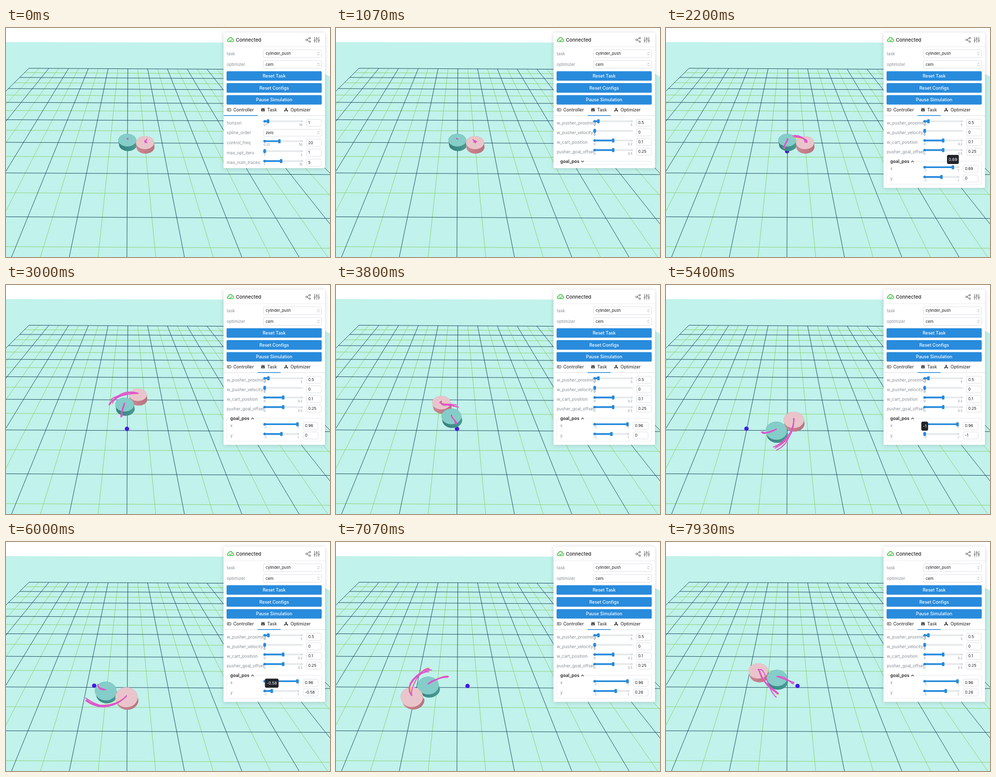
These frames come from a looping animation (640 px wide and 453 px high, 8 s). An HTML page with a canvas:

```html
<!DOCTYPE html>
<html lang="en">
<head>
<meta charset="utf-8">
<style>
html, body { margin: 0; width: 640px; height: 453px; overflow: hidden; background: #fff; }
canvas { display: block; width: 640px; height: 453px; }
</style>
</head>
<body>
<canvas id="stage"></canvas>
<script>
const LOOP = 8000, BLUE = '#288bdc', GRAY = '#868e96', BORDER = '#d5dade', INK = '#1a1a1a';
const canvas = document.getElementById('stage');
const dpr = window.devicePixelRatio || 1;
canvas.width = 640 * dpr;
canvas.height = 453 * dpr;
const g = canvas.getContext('2d');

// Where the teal body is, and at what angle (degrees) the pink pusher touches it
const POSES = [
  { at: 2400, x: 239.5, y: 222, angle: 11 },
  { at: 3800, x: 228, y: 260, angle: -120 },
  { at: 4800, x: 236, y: 278, angle: -81 },
  { at: 6000, x: 197, y: 295, angle: 19 },
  { at: 7070, x: 182, y: 284, angle: 140 },
  { at: 7930, x: 219, y: 269, angle: 205 },
  { at: 8800, x: 252, y: 282, angle: 140 }
];

const clamp = v => Math.max(0, Math.min(1, v));
const ramp = (t, from, to) => clamp((t - from) / (to - from));
const goalX = t => 0.96 * ramp(t, 2000, 2280);
const goalY = t => 1.26 * ramp(t, 5800, 6400) - ramp(t, 4200, 4600);

// Perspective radius and flattening of a cylinder at stage height y
const radius = y => 0.0525 * (y + 114.7);
const flatness = y => (y + 114.7) / 475;

function random(seed) {
  const v = Math.sin(seed * 127.1 + 11.7) * 43758.5453;
  return v - Math.floor(v) - 0.5;
}

// Catmull-Rom through the poses
function bodiesAt(t) {
  const last = POSES.length - 1;
  let k = 0;
  while (k < last - 1 && t >= POSES[k + 1].at) k++;
  const pose = i => POSES[Math.max(0, Math.min(last, i))];
  const [a, b, c, d] = [-1, 0, 1, 2].map(i => pose(k + i));
  const u = ramp(t, b.at, c.at);
  const mix = key => b[key] + u / 2 * (c[key] - a[key] +
    u * (2 * a[key] - 5 * b[key] + 4 * c[key] - d[key] +
    u * (3 * (b[key] - c[key]) + d[key] - a[key])));
  const x = mix('x'), y = mix('y'), angle = mix('angle') * Math.PI / 180;
  const reach = 2.02 * radius(y);
  return {
    teal: { x, y },
    pink: { x: x + reach * Math.cos(angle), y: y + reach * flatness(y) * Math.sin(angle) }
  };
}

// Ground coordinates (cells from the middle) to the stage
function project(x, z) {
  const depth = 2265.7 / (6.636 - z), sx = 240.7 + x * 0.2005 * depth, sy = depth - 114.7;
  return [sx - 0.005 * (sy - 80), sy + 0.005 * (sx - 120)];
}

function line(points, color, width) {
  g.beginPath();
  points.forEach(p => g.lineTo(...p));
  g.strokeStyle = color;
  g.lineWidth = width;
  g.stroke();
}

function disc(x, y, r, fill, stroke) {
  g.beginPath();
  g.arc(x, y, r, 0, 7);
  g.fillStyle = fill;
  g.fill();
  if (stroke) { g.strokeStyle = stroke; g.stroke(); }
}

function box(x, y, w, h, r, fill, stroke) {
  g.beginPath();
  g.roundRect(x, y, w, h, r);
  if (fill) { g.fillStyle = fill; g.fill(); }
  if (stroke) { g.strokeStyle = stroke; g.lineWidth = 0.8; g.stroke(); }
}

function text(str, x, y, size, color, align = 'left', weight = 400) {
  g.font = `${weight} ${size}px Inter, sans-serif`;
  g.textAlign = align;
  g.fillStyle = color;
  g.fillText(str, x, y);
}

function drawGround() {
  g.fillStyle = '#c1f2eb';
  g.fill(new Path2D('M0 28L511 29L640 96V453H0Z'));
  for (const major of [false, true]) {
    const color = major ? '#17455a' : '#7dcb58', width = major ? 0.9 : 0.75;
    for (let i = major ? -5 : -4.5; i <= 5; i++) {
      line([project(i, -5), project(i, 3.2)], color, width);
      line([project(-5, i), project(5, i)], color, width);
    }
  }
}

function drawCylinder({ x, y, top, side, dark }) {
  const rx = radius(y), ry = rx * flatness(y);
  const bx = x + (320 - x) * 0.018, by = y + 9 - (y - 222) * 0.045;
  const shade = g.createLinearGradient(x - rx, 0, x + rx, 0);
  shade.addColorStop(0, side);
  shade.addColorStop(1, dark);
  g.fillStyle = shade;
  g.beginPath();
  g.ellipse(bx, by, rx, ry, 0, 0, Math.PI);
  g.ellipse(x, y, rx, ry, 0, Math.PI, 0);
  g.fill();
  g.fillStyle = top;
  g.beginPath();
  g.ellipse(x, y, rx, ry, 0, 0, 7);
  g.fill();
}

// Sampled guesses of the coming path, scattering with distance
function drawPlan(name, t, scatter) {
  const step = Math.floor(t / 66.7), future = [];
  for (let i = 0; i <= 9; i++) future.push(bodiesAt(t + i * 100)[name]);
  for (let s = 0; s < 5; s++) {
    const drift = axis => scatter * random(step * 17 + s * 3 + axis);
    const bend = axis => scatter * random(step * 29 + s * 5 + axis);
    const points = future.map(({ x, y }, i) => {
      const u = i / 9, wave = Math.sin(u * 5);
      return [x + drift(1) * u + bend(1) * wave, y - 3 + drift(2) * u + bend(2) * wave];
    });
    line(points, s ? '#e052cf' : '#e8dc55', 1.9);
  }
}

function drawScene(t) {
  drawGround();
  const { teal, pink } = bodiesAt(t);
  Object.assign(teal, { top: '#84cdc8', side: '#357f7b', dark: '#489994' });
  Object.assign(pink, { top: '#e9c5cb', side: '#cd8993', dark: '#b9737f' });
  const [x, y] = project(goalY(t - 110), goalX(t - 110));
  disc(x - 0.7, y - 0.5, 4.3, '#4319e6');
  [teal, pink].sort((a, b) => a.y - b.y).forEach(drawCylinder);
  drawPlan('pink', t, 7);
  drawPlan('teal', t, 2.5);
}

function chevron(x, y, dir, size, color, width) {
  line([[x - size, y - dir * size / 2], [x, y + dir * size / 2], [x + size, y - dir * size / 2]], color, width);
}

function select(label, value, y, h = 15.5) {
  text(label, 436, y + 3, 8.3, GRAY);
  box(508.4, y - h / 2, 115, h, 2.5, '#fff', BORDER);
  text(value, 513, y + 2.5, 7.5, INK);
  [-1, 1].forEach(dir => chevron(617, y + 2 * dir, dir, 1.8, GRAY, 0.7));
}

function slider(label, y, value, min, max, nested) {
  const end = nested ? 577 : 584, track = y - 3;
  const knob = 511 + (end - 511) * (max > min ? (value - min) / (max - min) : 0);
  const mark = max > min ? end : 511, inputX = nested ? 587 : 593.5;
  text(label, nested ? 443 : 436, y + 3, 8.3, GRAY);
  box(508.5, track - 1.7, end - 505.5, 3.4, 1.7, '#e6e9ec');
  box(508.5, track - 1.7, knob - 508.5, 3.4, 1.7, BLUE);
  disc(mark, track, 1.7, '#d5dade');
  disc(511, track, 2.6, BLUE);
  text(min, 509, track + 9, 6, GRAY);
  text(max, mark + 1.5, track + 9, 6, GRAY, 'right');
  box(knob - 2.5, track - 4, 5, 8, 1.5, BLUE);
  box(inputX, y - 7, 29.5, 14, 2.5, '#fff', BORDER);
  text(+value.toFixed(2), inputX + 3.5, y + 2.7, 7.6, INK);
}

function tooltip(value, y) {
  const label = String(+value.toFixed(2)), x = 544 + 33 * value;
  g.font = '400 8px Inter, sans-serif';
  const w = g.measureText(label).width + 6.5;
  box(x - w / 2, y - 9, w, 18, 3, '#212529');
  text(label, x, y + 3, 8, '#fff', 'center');
}

// Three vertical controls, each with a handle
function tuneIcon(x, y, s, color, width) {
  [-1, 0, 1].forEach(i => {
    const cx = x + i * s * 0.75;
    line([[cx, y - s], [cx, y + s]], color, width);
    disc(cx, y + (i ? s * 0.25 : -s * 0.35), s * 0.24, '#fff', color);
  });
}

// Dots joined to a hub
function linkIcon(hub, ends, r, fill, color) {
  ends.forEach(p => line([hub, p], color, 0.9));
  [hub, ...ends].forEach(p => disc(...p, r, fill, color));
}

function drawHeader() {
  g.strokeStyle = '#45c645';
  g.lineWidth = 1.5;
  g.stroke(new Path2D('M440.5 27C436 27 436.5 21.8 440 22C440.5 17.5 447 18 447 22C451 21.8 450.5 27 447 27Z'));
  line([[441.5, 24.2], [443.4, 25.8], [446, 23]], '#45c645', 1.2);
  text('Connected', 454, 26.7, 9.6, '#222', 'left', 500);
  linkIcon([593.5, 23.5], [[600, 20], [600, 27]], 1.6, '#fff', '#555');
  tuneIcon(613.8, 23.3, 5.4, '#555', 0.9);
  line([[430, 37], [630, 37]], '#e6e9ec', 0.8);
}

function drawTabs(taskTab) {
  line([[430, 173.5], [630, 173.5]], '#dee2e6', 1);
  box(taskTab ? 497 : 430, 172.6, taskTab ? 45.5 : 67, 1.5, 0, BLUE);
  box(437, 159.3, 7.4, 5, 1.2, null, INK);
  line([[439, 161.8], [441, 161.8]], INK, 1.2);
  tuneIcon(507.6, 161.8, 3.2, INK, 1.1);
  linkIcon([553.3, 162], [[553.3, 159.3], [550.8, 163.8], [555.8, 163.8]], 0.9, INK, INK);
  text('Controller', 449, 165, 8.7, INK);
  text('Task', 516, 165, 8.7, INK);
  text('Optimizer', 562, 165, 8.7, INK);
}

function drawController() {
  const row = i => 187.5 + 19.7 * i;
  slider('horizon', row(0), 1, 0.1, 10);
  select('spline_order', 'zero', row(1), 13.5);
  slider('control_freq', row(2), 20, 0.25, 50);
  slider('max_opt_iters', row(3), 1, 1, 2);
  slider('max_num_traces', row(4), 5, 1, 10);
}

function drawFolder(t, open) {
  const x = goalX(t), y = goalY(t), height = 6.5 + 39 * open;
  box(436, 263.5, 187.5, height, 2.5, null, '#e3e6e9');
  box(440, 258, 53, 11.5, 0, '#fff');
  text('goal_pos', 443, 266.5, 8.6, '#222', 'left', 600);
  chevron(487, 264, open ? -1 : 1, 2.4, '#333', 1.1);
  if (!open) return;
  g.save();
  g.beginPath();
  g.rect(430, 268, 200, height - 4.5);
  g.clip();
  slider('x', 278.4, x, -1, 1, true);
  slider('y', 297.7, y, -1, 1, true);
  g.restore();
  if (t > 2000 && t < 2700) tooltip(x, 260);
  if (t > 4150 && t < 6600) tooltip(y, 279.3);
}

function drawTask(t, open) {
  const row = i => 187.5 + 19 * i;
  slider('w_pusher_proximity', row(0), 0.5, 0, 5);
  slider('w_pusher_velocity', row(1), 0, 0, 0);
  slider('w_cart_position', row(2), 0.1, 0, 0.2);
  slider('pusher_goal_offset', row(3), 0.25, 0, 0.5);
  drawFolder(t, open);
}

function drawPanel(t) {
  const open = ramp(t, 1800, 2000), taskTab = t >= 500;
  g.shadowColor = 'rgba(0,0,0,.16)';
  g.shadowBlur = 9 * dpr;
  g.shadowOffsetY = dpr;
  box(429.7, 9.3, 200.3, 268 + 39 * open, 2, '#fff');
  g.shadowColor = 'transparent';
  drawHeader();
  select('task', 'cylinder_push', 50.8);
  select('optimizer', 'cem', 72);
  ['Reset Task', 'Reset Configs', 'Pause Simulation'].forEach((label, i) => {
    const y = 85.5 + i * 23.6;
    box(435.7, y, 188, 18.8, 2, BLUE);
    text(label, 529.7, y + 12.5, 8.75, '#fff', 'center', 500);
  });
  drawTabs(taskTab);
  if (taskTab) drawTask(t, open); else drawController();
}

function frame(now) {
  const t = now % LOOP;
  g.setTransform(dpr, 0, 0, dpr, 0, 0);
  g.lineCap = g.lineJoin = 'round';
  g.fillStyle = '#fff';
  g.fillRect(0, 0, 640, 453);
  drawScene(t);
  drawPanel(t);
  requestAnimationFrame(frame);
}
requestAnimationFrame(frame);
</script>
</body>
</html>
```
